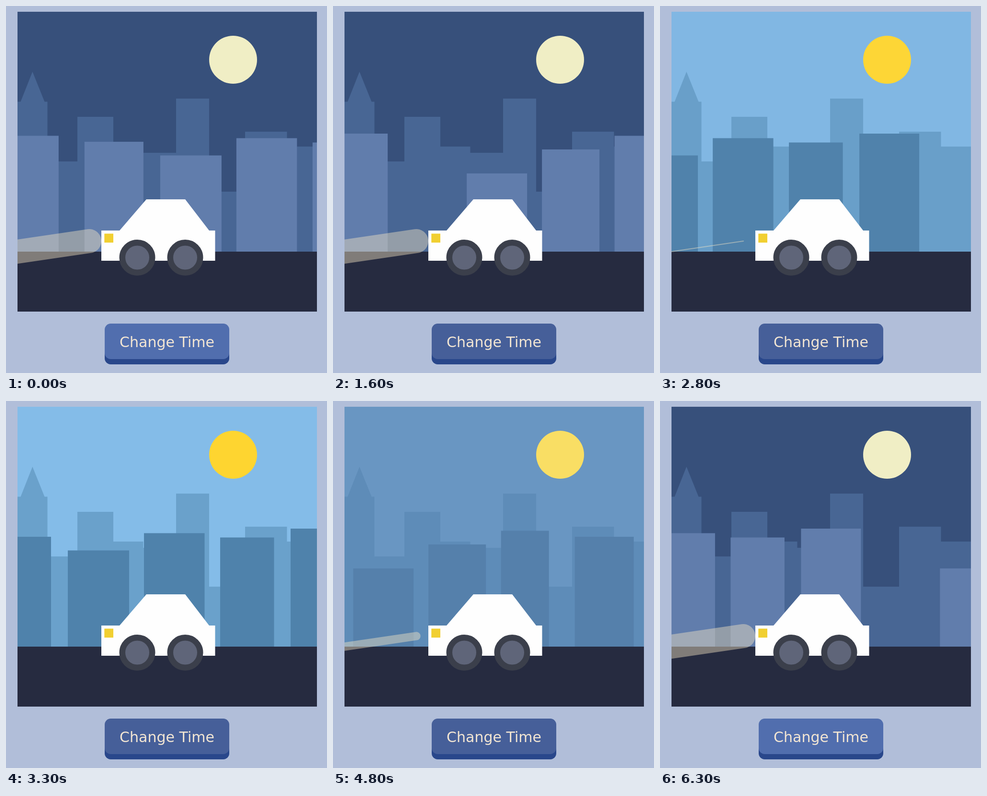
Write an HTML page that moves like this. It is 670 px wide and 765 px high and loops after 6400 ms.

```html
<!DOCTYPE html>
<html lang="en">
<head>
<meta charset="utf-8">
<title>Night drive</title>
<style>
  html, body { margin: 0; width: 100%; height: 100%; overflow: hidden; background: #b1bed9; }
  svg { display: block; }
  text { font: 30px "DejaVu Sans", sans-serif; fill: #f3e6d3; text-anchor: middle; }
</style>
</head>
<body>
<svg width="670" height="765" viewBox="0 0 670 765">
  <clipPath id="panel"><rect x="24" y="12" width="625" height="625"/></clipPath>
  <g clip-path="url(#panel)">
    <rect id="sky" x="24" y="12" width="625" height="625"/>
    <circle id="sun" cx="474" cy="112" r="50"/>
    <path id="skyline" d="M24 520V199.5H30.5L55.3 137L80.5 199.5H86.5V324H149V231H224V293H286.5V306H355V193H424V387H499V262H586.5V293H649V520Z"/>
    <g id="blocks"></g>
    <rect x="24" y="512" width="625" height="125" fill="#262b40"/>
    <path id="beam" d="M174 490L-126 534" stroke="#f5e6c4" stroke-opacity=".43" stroke-linecap="round"/>
    <path d="M199 468H237L293 403H374L424 468H436.5V531H199Z" fill="#fefefe"/>
    <rect x="205.3" y="474.5" width="18.7" height="18.7" fill="#f1cf31"/>
    <g fill="#5f6579" stroke="#3b3f4b" stroke-width="12.5">
      <circle cx="274" cy="524.5" r="31.25"/>
      <circle cx="374" cy="524.5" r="31.25"/>
    </g>
  </g>
  <rect x="206" y="673" width="260" height="74" rx="12.5" fill="#29478b"/>
  <rect x="206" y="690" width="260" height="40" fill="#29478b"/>
  <g id="button">
    <rect id="face" x="206" y="662" width="260" height="74" rx="12.5"/>
    <text x="336" y="711">Change Time</text>
  </g>
</svg>
<script>
const LOOP = 6400, FADE = 960;
const DAY_START = 2088, NIGHT_START = 4587;
const SPEED = 0.3558, TRAVEL = 1367, REPEAT = 1375.5, WRAP_AT = 430;

// Front buildings: offset, width, top
const BUILDINGS = [
  [-308.5, 126, 349], [-151.5, 120, 299], [0, 100, 270.5], [154, 123, 283],
  [312, 128, 311.5], [471, 126.5, 275.5], [630, 112.5, 284.5], [777, 125, 266]
];
// Night and day colours
const COLORS = {
  sky: [[55, 80, 123], [132, 188, 232]],
  sun: [[240, 238, 197], [254, 213, 48]],
  skyline: [[72, 102, 148], [106, 161, 203]],
  blocks: [[97, 125, 172], [79, 130, 171]]
};

const $ = id => document.getElementById(id);
const set = (id, name, value) => $(id).setAttribute(name, value);

$("blocks").innerHTML = [0, REPEAT].map(shift => BUILDINGS.map(([x, w, top]) =>
  `<rect x="${x + shift}" y="${top}" width="${w}" height="${515 - top}"/>`).join("")).join("");

// CSS "ease": cubic-bezier(.25, .1, .25, 1)
function ease(p) {
  if (p <= 0) return 0;
  if (p >= 1) return 1;
  const bezier = (s, a, b) => 3 * a * s * (1 - s) ** 2 + 3 * b * s * s * (1 - s) + s ** 3;
  let lo = 0, hi = 1;
  for (let i = 0; i < 24; i++) {
    const mid = (lo + hi) / 2;
    if (bezier(mid, .25, .25) < p) lo = mid; else hi = mid;
  }
  return bezier(lo, .1, 1);
}

function draw(t) {
  const day = ease((t - DAY_START) / FADE) - ease((t - NIGHT_START) / FADE);
  for (const [id, [night, noon]] of Object.entries(COLORS)) {
    const rgb = night.map((c, i) => Math.round(c + (noon[i] - c) * day));
    set(id, "fill", `rgb(${rgb})`);
  }

  const start = WRAP_AT - TRAVEL;
  const x = (9.5 + SPEED * t - start) % TRAVEL + start;
  set("blocks", "transform", `translate(${x})`);

  set("beam", "stroke-width", 50 * (1 - day));
  set("beam", "visibility", day > 0.995 ? "hidden" : "visible");

  const hover = t >= 1150 && t < 5300;
  const pressed = t >= 3860 && t < 4000;
  set("face", "fill", hover ? "#465f99" : "#516eae");
  set("button", "transform", `translate(0 ${pressed ? 5 : 0})`);
}

function frame() {
  draw(performance.now() % LOOP);
  requestAnimationFrame(frame);
}
frame();
</script>
</body>
</html>
```
